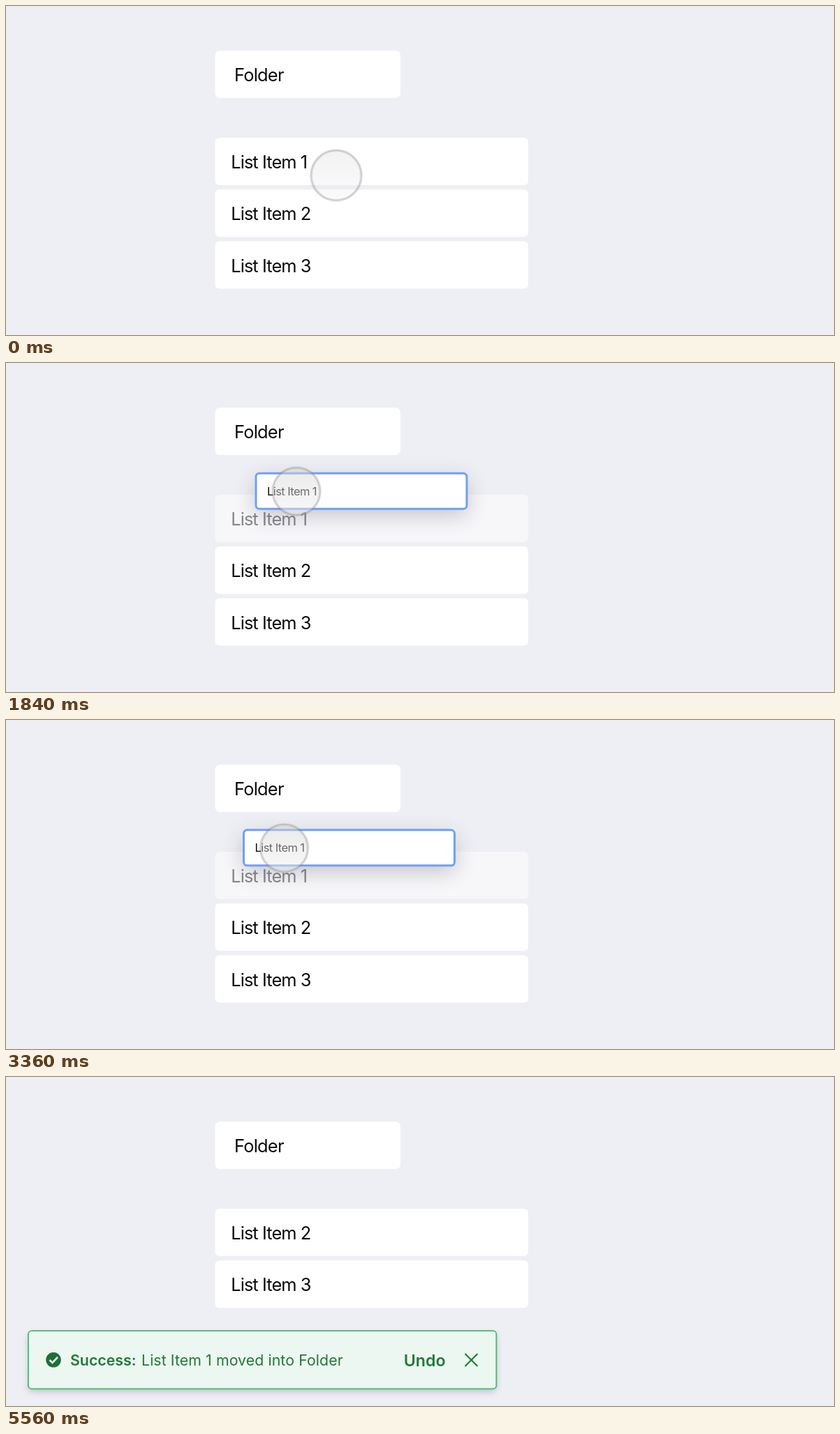
These frames come from a looping animation (1186x472 px, 5600 ms). An HTML page with a canvas:

```html
<!DOCTYPE html>
<html lang="en">
<head>
<meta charset="utf-8">
<title>Drag into folder</title>
<style>
  html, body { margin: 0; height: 100%; overflow: hidden; background: #eeeff4; }
  canvas { display: block; }
</style>
</head>
<body>
<canvas id="stage" width="1186" height="472"></canvas>
<script>
const ctx = document.getElementById('stage').getContext('2d');
const LOOP = 5600;
const BLUE = '#71a0f6', GREEN = '#22773a';

// Pointer path: time, x, y
const PATH = [
  [20, 473, 243], [240, 487.5, 224], [680, 487.5, 224], [1260, 510, 200],
  [1320, 510, 200], [1840, 416, 184], [1920, 416, 184], [2480, 399.5, 121],
  [2530, 399, 121], [3000, 398.5, 184], [3160, 398.5, 186], [3340, 398.5, 184.5],
  [3700, 397.5, 99.5], [4940, 397.5, 99.5], [5520, 830, -42]
];

const mix = (a, b, p) => a + (b - a) * p;
const progress = (t, from, to) => Math.min(1, Math.max(0, (t - from) / (to - from)));
const smooth = (t, from, to) => {
  const p = progress(t, from, to);
  return p * p * (3 - 2 * p);
};

function pointerAt(t) {
  const i = PATH.findIndex(k => k[0] > t);
  if (i === 0) return PATH[0].slice(1);
  if (i < 0) return PATH[PATH.length - 1].slice(1);
  const [t0, x0, y0] = PATH[i - 1], [t1, x1, y1] = PATH[i];
  const p = smooth(t, t0, t1);
  return [mix(x0, x1, p), mix(y0, y1, p)];
}

function withAlpha(alpha, draw) {
  if (alpha <= 0) return;
  ctx.save();
  ctx.globalAlpha *= alpha;
  draw();
  ctx.restore();
}

function box(x, y, w, h, r, fill, stroke, line = 0) {
  ctx.beginPath();
  ctx.roundRect(x + line / 2, y + line / 2, w - line, h - line, r);
  if (fill) {
    ctx.fillStyle = fill;
    ctx.fill();
  }
  if (stroke) {
    ctx.shadowColor = 'transparent';
    ctx.strokeStyle = stroke;
    ctx.lineWidth = line;
    ctx.stroke();
  }
}

function text(str, x, y, size, { color = '#0b0b0b', weight = 400, track = 0 } = {}) {
  ctx.font = `${weight} ${size}px Inter, "Liberation Sans", sans-serif`;
  ctx.letterSpacing = track * size + 'px';
  ctx.fillStyle = color;
  ctx.fillText(str, x, y);
}

function line(points, color, width) {
  ctx.beginPath();
  points.forEach(([x, y]) => ctx.lineTo(x, y));
  ctx.strokeStyle = color;
  ctx.lineWidth = width;
  ctx.stroke();
}

function item(n, y, alpha = 1) {
  withAlpha(alpha, () => {
    box(299.5, y, 448.5, 68, 6, '#fff');
    text('List Item ' + n, 322.2, y + 44, 25.4, { track: -0.036 });
  });
}

function folder(t) {
  box(299.5, 64, 265.5, 68, 7, '#fff');
  const hover = smooth(t, 2260, 2360) * (1 - smooth(t, 2760, 2860)) + smooth(t, 3500, 3600);
  const settle = smooth(t, 3840, 4200);
  withAlpha(hover * (1 - settle), () => box(299.5, 64, 265, 68, 5, '#eef4ff'));
  withAlpha(hover * (1 - smooth(t, 4000, 4400)), () =>
    box(299.5, 64, 265, 68, 5, null, settle > 0.5 ? '#a9cdf0' : BLUE, mix(3, 1.3, settle)));
  const out = mix(0, 5.5, 1 - (1 - progress(t, 3880, 4360)) ** 2);
  withAlpha(0.75 * smooth(t, 3880, 4000) * (1 - smooth(t, 4160, 4560)), () =>
    box(299.5 - out, 64 - out, 265.5 + 2 * out, 68 + 2 * out, 7, null, BLUE, 3));
  text('Folder', 327, 108, 25.4, { track: -0.03 });
}

function draggedCard(t, px, py) {
  if (t < 680) return;
  const lift = smooth(t, 680, 900);
  const x = mix(299.5, px - 59.5, lift), y = mix(189, py - 27.3, lift);
  const w = mix(448.5, 305, lift), h = mix(68, 54, lift);
  withAlpha(smooth(t, 660, 760) * (1 - smooth(t, 3740, 3900)), () => {
    ctx.shadowColor = `rgba(50, 50, 70, ${0.27 * lift})`;
    ctx.shadowBlur = 30;
    ctx.shadowOffsetY = 9;
    box(x, y, w, h, 5, '#fff', BLUE, 3);
    text('List Item 1', x + mix(22.7, 17.6, lift), y + h / 2 + mix(10, 6, lift),
      mix(25.4, 16.5, lift), { track: -0.036 });
  });
}

function pointer(t, x, y) {
  const press = smooth(t, 390, 490) * (1 - smooth(t, 3740, 3860));
  const r = mix(36, 34, press);
  const fill = ctx.createLinearGradient(0, y - r, 0, y + r);
  const alpha = mix(0.28, 0.46, press);
  fill.addColorStop(0, `rgba(210, 210, 210, ${alpha})`);
  fill.addColorStop(1, `rgba(240, 240, 240, ${alpha})`);
  ctx.beginPath();
  ctx.arc(x, y, r, 0, Math.PI * 2);
  ctx.fillStyle = fill;
  ctx.fill();
  ctx.strokeStyle = 'rgba(130, 130, 130, .12)';
  ctx.lineWidth = 4.5;
  ctx.stroke();
  ctx.strokeStyle = 'rgba(120, 120, 120, .26)';
  ctx.lineWidth = 2.4;
  ctx.stroke();
}

function toast(t) {
  const rise = 1 - (1 - progress(t, 4240, 4680)) ** 3;
  withAlpha(smooth(t, 4240, 4400), () => {
    ctx.translate(0, 115 * (1 - rise));
    ctx.save();
    ctx.shadowColor = 'rgba(40, 50, 80, .25)';
    ctx.shadowBlur = 10;
    ctx.shadowOffsetY = 4;
    box(31, 363.3, 672.3, 85, 5, '#ebf7f0', '#45b968', 1.8);
    ctx.restore();
    ctx.beginPath();
    ctx.arc(68, 405.8, 10.8, 0, Math.PI * 2);
    ctx.fillStyle = '#1d6f36';
    ctx.fill();
    line([[62.5, 406], [66.5, 410], [74, 402]], '#ebf7f0', 2.6);
    text('Success:', 92, 413.5, 21.3, { color: GREEN, weight: 600 });
    text('List Item 1 moved into Folder', 194, 413.5, 21.3, { color: GREEN, track: 0.004 });
    text('Undo', 569.8, 415, 23.2, { color: GREEN, weight: 600 });
    line([[657.5, 397], [675.5, 415]], GREEN, 2.1);
    line([[675.5, 397], [657.5, 415]], GREEN, 2.1);
  });
}

function draw(t) {
  ctx.fillStyle = '#eeeff4';
  ctx.fillRect(0, 0, 1186, 472);
  const [px, py] = pointerAt(t);
  const shift = 74.3 * smooth(t, 3900, 4300);
  folder(t);
  item(1, 189, mix(1, 0.48, smooth(t, 680, 800)) * (1 - smooth(t, 3780, 3920)));
  item(2, 263.3 - shift);
  item(3, 337.6 - shift);
  draggedCard(t, px, py);
  toast(t);
  pointer(t, px, py);
}

const start = performance.now();
function tick() {
  draw((performance.now() - start) % LOOP);
  requestAnimationFrame(tick);
}
tick();
</script>
</body>
</html>
```
